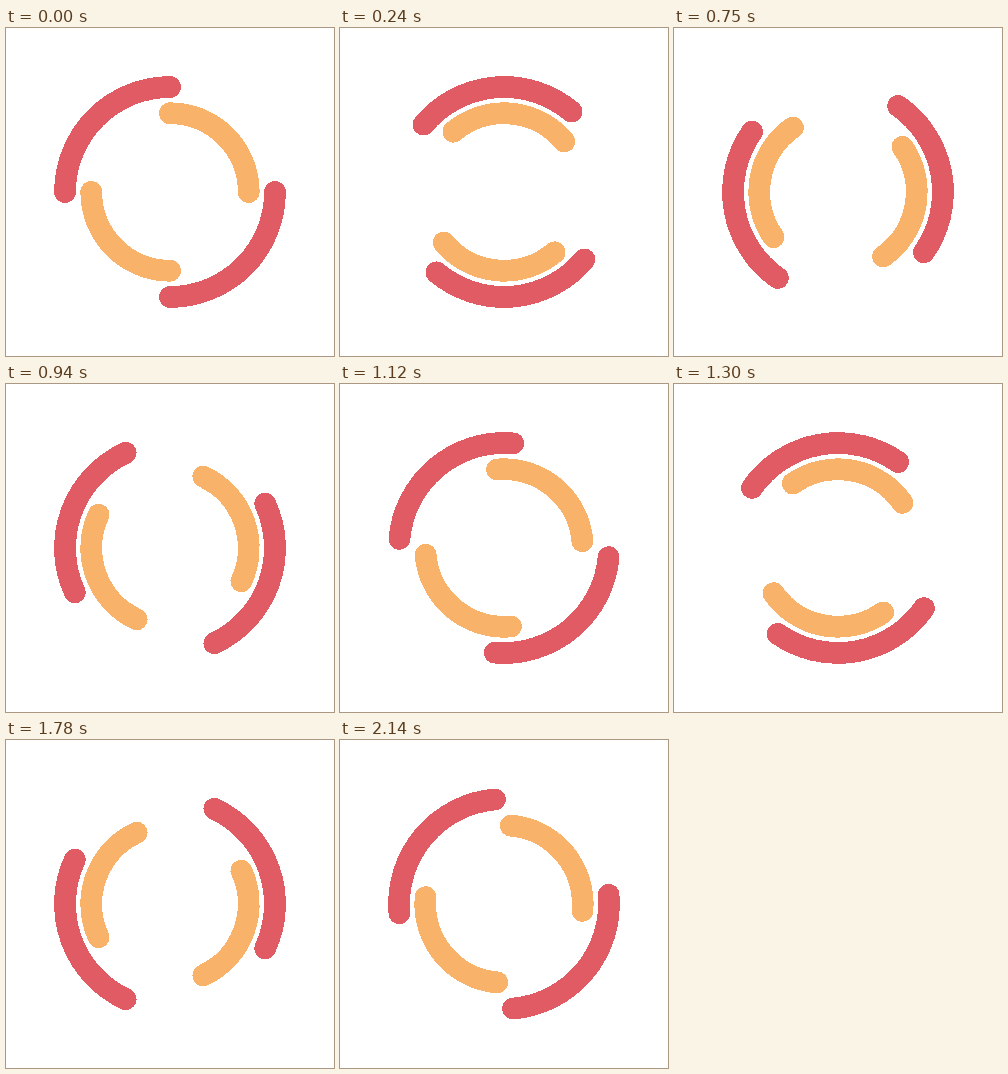
These frames come from a looping animation (328 px wide and 328 px high, 2.17 s). An HTML page:

```html
<!DOCTYPE html>
<html lang="en">
<head>
<meta charset="utf-8">
<title>Double ring spinner</title>
<style>
  @property --turn {
    syntax: "<angle>";
    inherits: true;
    initial-value: 0deg;
  }
  html, body {
    margin: 0;
    width: 100%;
    height: 100%;
    overflow: hidden;
    background: #fff;
  }
  svg {
    display: block;
    width: 100%;
    height: 100%;
    animation: turn 2170ms -2ms infinite;
  }
  path {
    fill: none;
    stroke-width: 6.65;
    stroke-linecap: round;
    shape-rendering: crispEdges;
  }
  .outer {
    stroke: #e15b64;
    transform: rotate(var(--turn));
  }
  .inner {
    stroke: #f8b26a;
    transform: rotate(calc(-1 * var(--turn)));
  }

  /* 5 degrees every 30 ms, with one 40 ms hold at 125 degrees */
  @keyframes turn {
    0% { --turn: 0deg; animation-timing-function: steps(25); }
    34.56221% { --turn: 125deg; animation-timing-function: steps(1); }
    36.40553% { --turn: 130deg; animation-timing-function: steps(46); }
    100% { --turn: 360deg; }
  }
</style>
</head>
<body>
<!-- each ring is two opposite quarter arcs -->
<svg viewBox="-50 -50 100 100">
  <path class="outer" d="M32 0A32 32 0 0 1 0 32M-32 0A32 32 0 0 1 0 -32"/>
  <path class="inner" d="M0 24A24 24 0 0 1 -24 0M0 -24A24 24 0 0 1 24 0"/>
</svg>
</body>
</html>
```
